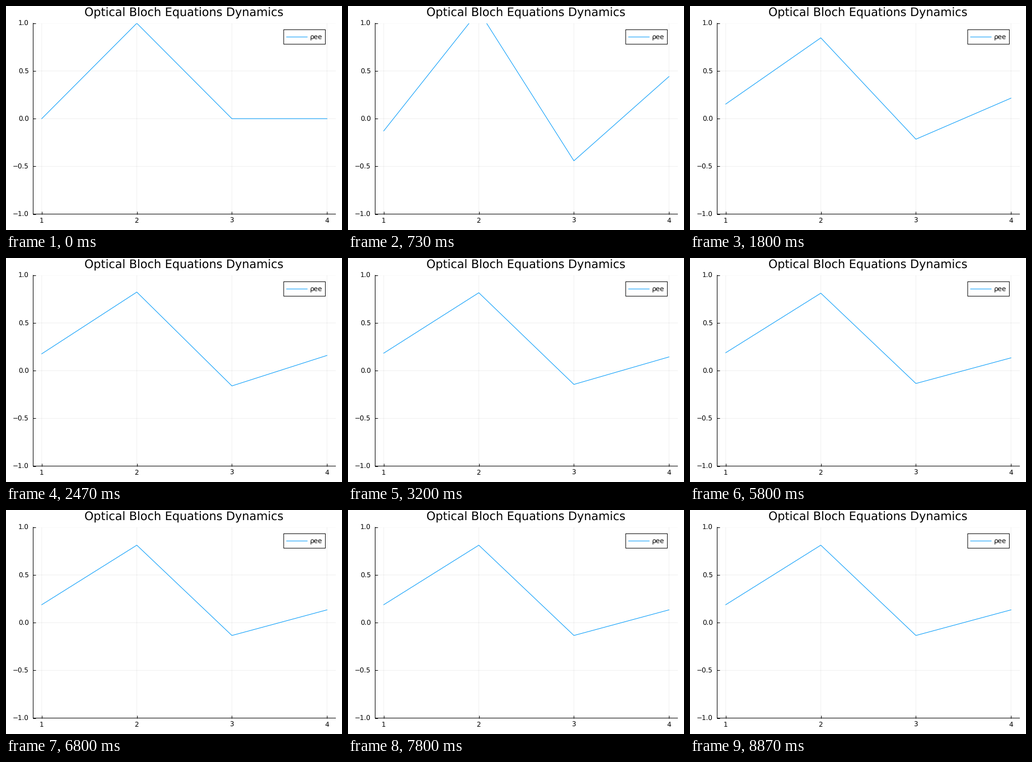
Animation, 600 px wide and 400 px high, one loop 8.94 s. Source, as a matplotlib script:

```python
import numpy as np
import matplotlib.pyplot as plt
from matplotlib.animation import FuncAnimation
from matplotlib.patches import Rectangle

W, H, DPI = 600, 400, 100
FRAMES, LOOP_MS = 134, 8940
LEFT, RIGHT, TOP, BOTTOM = 48.5, 588.5, 30.8, 371.6
BLUE = "#009AFA"
PX = 72 / DPI  # points per pixel

# Optical Bloch equations for [ee, gg, ge, eg]
OMEGA, GAMMA, DELTA = 1.0, 0.5, 2.5
R = 0.5j * OMEGA
D = GAMMA / 2 + 1j * DELTA
BLOCH = np.array([
    [-GAMMA, 0, -R, R],
    [GAMMA, 0, R, -R],
    [R, -R, -D, 0],
    [-R, R, 0, -D],
])
RATES, MODES = np.linalg.eig(BLOCH)
WEIGHTS = np.linalg.solve(MODES, [0, 1, 0, 0])


def clock(i):
    """Time steps grow at first, then settle to an even pace."""
    return 0.01248 * i ** 2 / np.cbrt(1 + (i / 41) ** 3)


def state(i):
    return np.real(MODES @ (WEIGHTS * np.exp(RATES * clock(i))))


plt.rcParams.update({
    "font.family": "DejaVu Sans",
    "text.hinting": "none",
    "axes.linewidth": PX,
    "path.snap": False,
})
fig = plt.figure(figsize=(W / DPI, H / DPI), dpi=DPI, facecolor="white")

ax = fig.add_axes([LEFT / W, 1 - BOTTOM / H,
                   (RIGHT - LEFT) / W, (BOTTOM - TOP) / H])
ax.set(xlim=(0.91, 4.09), ylim=(-1, 1),
       xticks=range(1, 5), yticks=np.linspace(-1, 1, 5))
ax.spines[["top", "right"]].set_visible(False)
ax.tick_params(direction="in", length=5 * PX, width=PX,
               labelbottom=False, labelleft=False)
ax.set_axisbelow(True)
ax.grid(color="black", alpha=0.06, linewidth=PX)
line, = ax.plot(range(1, 5), state(0), color=BLUE, lw=PX)
for tick in ax.xaxis.get_major_ticks() + ax.yaxis.get_major_ticks():
    for mark in (tick.tick1line, tick.gridline):
        mark.set_snap(False)

# Overlay in pixel coordinates, y downwards
page = fig.add_axes([0, 0, 1, 1])
page.set(xlim=(0, W), ylim=(H, 0))
page.axis("off")


def label(x, y, text, ha, size=11.92):
    page.text(x, y, text, ha=ha, va="baseline", fontsize=size * PX,
              color="black")


label(317.8, 18.5, "Optical Bloch Equations Dynamics", "center", 20.73)
for n in range(1, 5):
    x = LEFT + (n - 0.91) / 3.18 * (RIGHT - LEFT)
    label(x - 0.5, 387, str(n), "center")
for v in np.linspace(-1, 1, 5):
    y = BOTTOM - (v + 1) / 2 * (BOTTOM - TOP)
    label(41, y + 4.4, f"{v:.1f}".replace("-", "\u2212"), "right")

page.add_patch(Rectangle((495.9, 42.3), 74.4, 25.9, fc="white", ec="black",
                         lw=PX))
page.plot([501, 538], [55.3, 55.3], color=BLUE, lw=PX)
label(543, 59.6, "\u03c1ee", "left")


def draw(i):
    line.set_ydata(state(i))
    return line,


anim = FuncAnimation(fig, draw, frames=FRAMES, interval=LOOP_MS / FRAMES,
                     repeat=True, repeat_delay=0)
plt.show()
```
